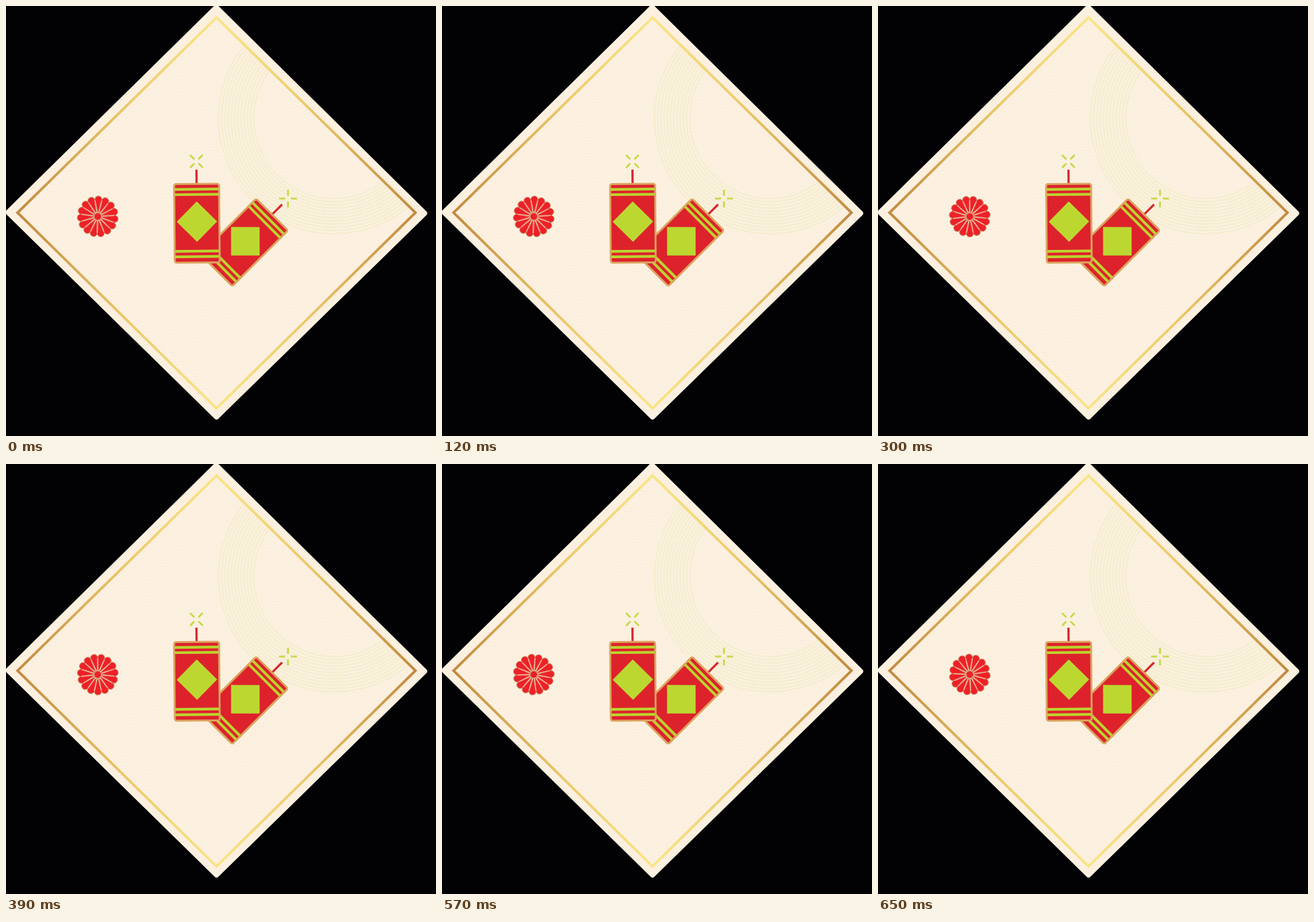
An HTML page that plays this animation: 670x670 px, repeating every 0.75 s.

```html
<!DOCTYPE html>
<html lang="en">
<head>
<meta charset="utf-8">
<title>Firecrackers</title>
<style>
  html, body { margin: 0; width: 100%; height: 100%; overflow: hidden; background: #020104; }
  svg { display: block; width: 100%; height: 100%; }
</style>
</head>
<body>
<svg viewBox="0 0 670 670">
  <defs>
    <linearGradient id="gold" gradientUnits="userSpaceOnUse" x1="0" y1="18" x2="0" y2="627">
      <stop offset="0" stop-color="#fae587"/>
      <stop offset=".22" stop-color="#ecca6c"/>
      <stop offset=".5" stop-color="#c28a40"/>
      <stop offset=".78" stop-color="#ecca6c"/>
      <stop offset="1" stop-color="#fae587"/>
    </linearGradient>
    <pattern id="waves" width="32" height="5" patternUnits="userSpaceOnUse" patternTransform="rotate(-12)">
      <path d="M0 2.5Q8 0 16 2.5T32 2.5" fill="none" stroke="#f6e5d0" stroke-width="1"/>
    </pattern>
    <clipPath id="inside"><path d="M328 12L644 322L328 633L12 322Z"/></clipPath>
    <g id="cracker">
      <path d="M0-83V-62" stroke="#d6262f" stroke-width="3.4"/>
      <rect x="-35" y="-60.800" width="70" height="122.600" rx="3" fill="#dd222c" stroke="#dca45f" stroke-width="3"/>
      <path d="M-34-52.500H34M-34-44.300H34M-34 44H34M-34 52.500H34" stroke="#bcd42f" stroke-width="4.2"/>
      <path d="M0-33.400L31.500-2L0 29.400L-31.500-2Z" fill="#bdd731"/>
      <path d="M-4-100L-9-105M4-100L9-105M-4-92L-9-87M4-92L9-87"
            stroke="#c7da4e" stroke-width="3" stroke-linecap="round"/>
    </g>
  </defs>

  <path d="M324 0Q327.500-3 331 0L655 320Q658 323 655 326L331 643Q328 646 325 643L1 325Q-2 321 1 318Z" fill="#fcf1e1"/>
  <path d="M327 0L655 323L328 643L0 321Z" fill="url(#waves)" opacity=".45"/>
  <g id="rings" clip-path="url(#inside)" fill="none" stroke="#f3edca" stroke-width="1.8"></g>
  <path d="M328 18L638 322L328 627L18 322Z" fill="none" stroke="url(#gold)" stroke-width="4"/>

  <use href="#cracker" transform="translate(371.500 368) rotate(45)"/>
  <use href="#cracker" transform="translate(297.500 338) rotate(-.5)"/>

  <g transform="translate(143 328)">
    <g id="flower"></g>
    <circle r="5.600" fill="#ee2028" stroke="#d9a173" stroke-width="1"/>
  </g>
</svg>
<script>
  const LOOP = 750, PETALS = 15, PITCH = 360 / PETALS;
  const rings = document.getElementById('rings');
  const flower = document.getElementById('flower');

  function add(parent, tag, attrs) {
    const el = document.createElementNS('http://www.w3.org/2000/svg', tag);
    for (const key in attrs) el.setAttribute(key, attrs[key]);
    parent.append(el);
  }

  for (let r = 125; r <= 180; r += 5) add(rings, 'circle', { cx: 511, cy: 175, r });

  for (let i = 0; i < PETALS; i++) {
    add(flower, 'path', {
      d: 'M0-4L-5.300-25.500C-6.300-34 6.300-34 5.300-25.500Z',
      fill: '#ee2028', stroke: '#b5713f', 'stroke-width': 0.8,
      transform: `rotate(${i * PITCH})`
    });
  }
  for (let i = 0; i < PETALS; i++) {
    add(flower, 'path', {
      d: 'M0-6V-26', stroke: '#f8d9bd', 'stroke-width': 1.3,
      transform: `rotate(${(i + 0.5) * PITCH})`
    });
  }

  // One petal pitch per loop, in equal held steps
  const START = 2, starts = [0, 200, 300, 450, 650];
  const frames = starts.map((ms, i) => ({
    offset: ms / LOOP,
    transform: `rotate(${START + i * PITCH / starts.length}deg)`,
    easing: 'steps(1, end)'
  }));
  frames.push({ offset: 1, transform: `rotate(${START + PITCH}deg)` });
  flower.animate(frames, { duration: LOOP, iterations: Infinity });
</script>
</body>
</html>
```
